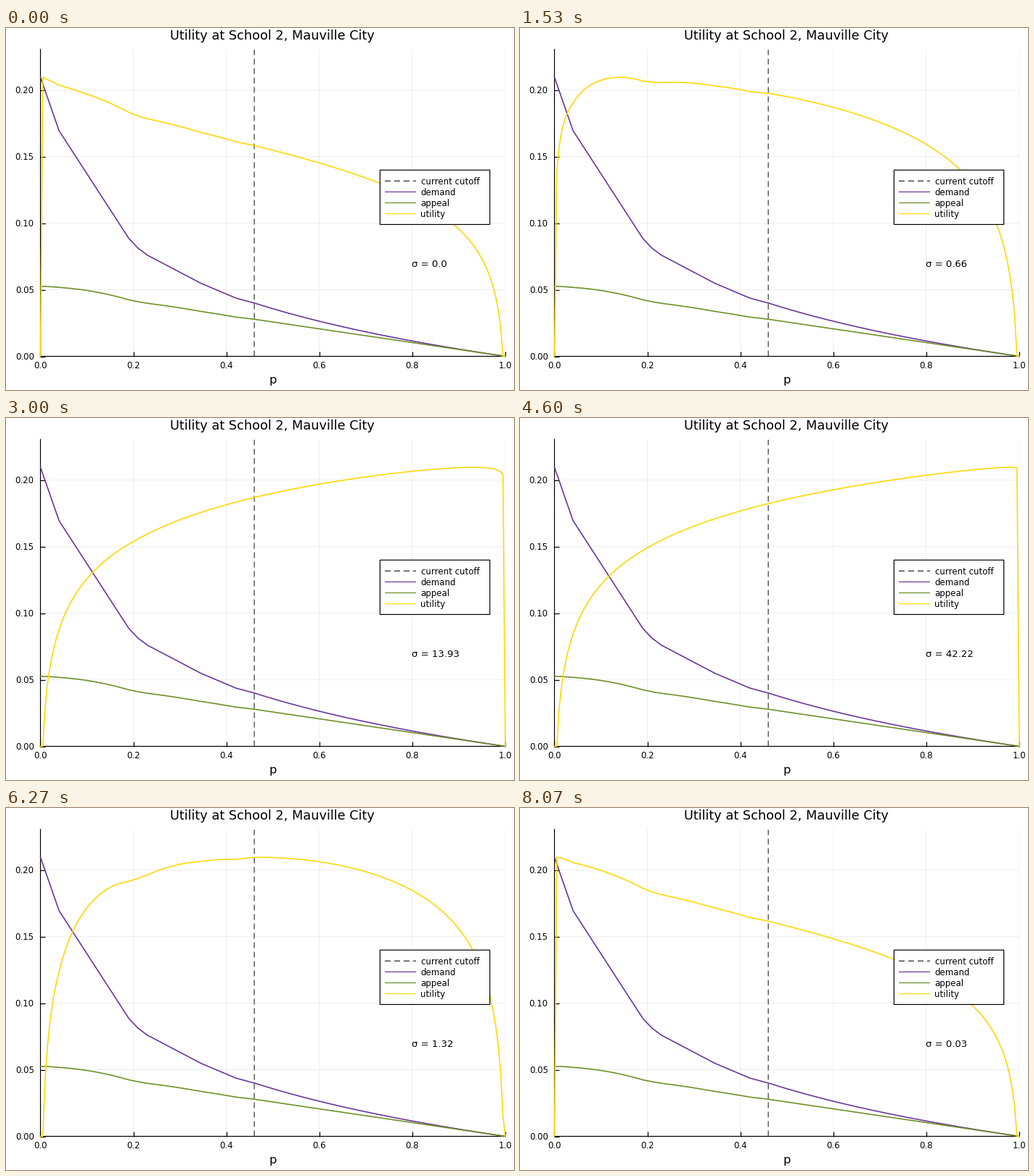
Write a matplotlib script that moves like this. It is 700 by 500 pixels and loops after 8140 ms.

```python
import numpy as np
import matplotlib.pyplot as plt
from matplotlib.animation import FuncAnimation
from matplotlib.patches import Rectangle

W, H, DPI = 700, 500, 100
LOOP, STEPS = 8140, 122
DRAWS = 3  # draws per step, so that each step can begin slightly early
LEFT, RIGHT, TOP, BOTTOM = 47.5, 688, 29.5, 453.5
YMAX, CUTOFF = 0.2306, 0.46
PURPLE, GREEN, GOLD = "rebeccapurple", "olivedrab", "gold"

plt.rcParams["font.family"] = "DejaVu Sans"
plt.rcParams["path.snap"] = False


def px(n):
    """Pixels to points."""
    return n * 72 / DPI


# Demand has a few kinks below the cutoff and falls as a logarithm above it
p = np.linspace(0, 1, 201)
kinks = [0, .04, .19, .21, .23, .345, .42, CUTOFF]
heights = [.2096, .1695, .0886, .0812, .0760, .0549, .0438, .0400]
demand = np.where(p < CUTOFF, np.interp(p, kinks, heights),
                  -0.0516 * np.log(np.maximum(p, CUTOFF)))
area = np.r_[0, np.cumsum((demand[1:] + demand[:-1]) / 2) * p[1]]
appeal = p * demand + area[-1] - area


def sigma_at(i):
    """Zero first, then 2^-5 up to 2^7 and back in steps of 2^0.2."""
    return 2 ** ((min(i, STEPS - i) - 26) / 5) if i else 0.0


def utility(sigma):
    """Log utility, rescaled to the height of the demand curve."""
    u = sigma * np.log(p[1:-1]) + np.log(demand[1:-1])
    u = (u - u.min()) / (u.max() - u.min()) * demand[0]
    return np.r_[0, u, 0]


fig = plt.figure(figsize=(W / DPI, H / DPI), dpi=DPI, facecolor="white")
ax = fig.add_axes([LEFT / W, 1 - BOTTOM / H, (RIGHT - LEFT) / W, (BOTTOM - TOP) / H])
ax.set(xlim=(0, 1), ylim=(0, YMAX))
ax.set_axisbelow(True)
ax.spines[["top", "right"]].set_visible(False)
for side in ("left", "bottom"):
    ax.spines[side].set(linewidth=px(1.2), zorder=1)
ax.grid(color="black", alpha=0.07, linewidth=px(1))
ax.tick_params(direction="in", length=px(7.4), width=px(1.2),
               labelbottom=False, labelleft=False)


def label(x, y, text, size, ha="left"):
    """Text with its baseline at a pixel position from the top left."""
    return fig.text(x / W, 1 - y / H, text, fontsize=px(size), ha=ha,
                    va="baseline", zorder=10)


xticks, yticks = np.arange(6) / 5, np.arange(5) / 20
ax.set_xticks(xticks)
ax.set_yticks(yticks)
for t in xticks:
    label(LEFT + t * (RIGHT - LEFT), 469.5, f"{t:.1f}", 11.8, "center")
for t in yticks:
    label(38.7, BOTTOM - t / YMAX * (BOTTOM - TOP) + 4.3, f"{t:.2f}", 11.8, "right")

center = (LEFT + RIGHT) / 2
label(center - 0.7, 16, "Utility at School 2, Mauville City", 17.8, "center")
label(center - 0.3, 491, "p", 16.2, "center")

dash = (0, (8 / 1.2, 5 / 1.2))
curve = dict(linewidth=px(1.6), clip_on=False)
ax.plot([CUTOFF, CUTOFF], [0, YMAX], color="#333333", lw=px(1.2), ls=dash,
        dash_capstyle="butt", zorder=2)
ax.plot(p, demand, color=PURPLE, zorder=3, **curve)
ax.plot(p, appeal, color=GREEN, zorder=4, **curve)
gold_line, = ax.plot(p, utility(0), color=GOLD, zorder=5, **curve)

# Legend, laid out in pixels above the plot
key = fig.add_axes([0, 0, 1, 1], zorder=5)
key.set(xlim=(0, W), ylim=(H, 0))
key.axis("off")
key.add_patch(Rectangle((515.4, 196.2), 151.3, 75.2, fc="white", ec="black", lw=px(1.2)))
rows = [("current cutoff", "#222222", dash), ("demand", PURPLE, "-"),
        ("appeal", GREEN, "-"), ("utility", GOLD, "-")]
for k, (name, color, style) in enumerate(rows):
    y = 211.3 + 15.1 * k
    key.plot([522, 565], [y, y], color=color, ls=style, lw=px(1.2),
             solid_capstyle="butt", dash_capstyle="butt")
    label(571.5, y + 4.3, name, 11.8)

note = label(559.2, 329.7, "", 13.3)


def draw(k):
    sigma = sigma_at(min((k + 1) // DRAWS, STEPS - 1))
    gold_line.set_ydata(utility(sigma))
    note.set_text(f"σ = {round(sigma, 2)}")
    return gold_line, note


anim = FuncAnimation(fig, draw, frames=STEPS * DRAWS, interval=LOOP / (STEPS * DRAWS),
                     repeat=True, repeat_delay=0)
plt.show()
```
